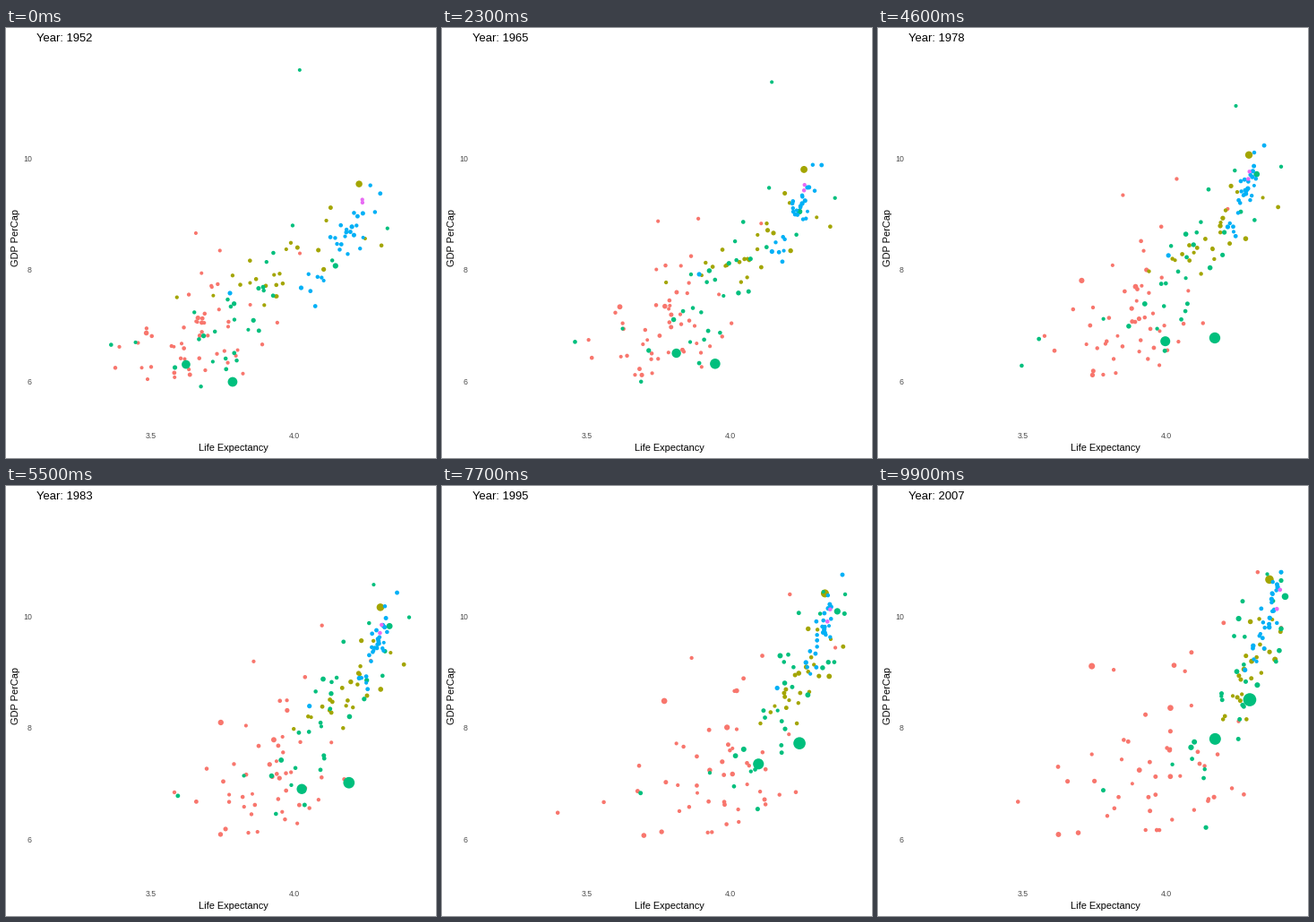
Animation of 480x480 px, one loop 10 s. Source, as a matplotlib script:

```python
import numpy as np
import matplotlib.pyplot as plt
from matplotlib.animation import FuncAnimation

FRAMES, INTERVAL, SIZE, DPI = 100, 100, 480, 72
KEYS = np.arange(1952, 2008, 5)
KNOTS = (1952, 1970, 1988, 2007)
rng = np.random.default_rng(7)

# Dots with a path of their own: (group, population, [(year, life, income), ...])
LEADS = [
    ("asia", 556, [(1952, 44, 400), (1957, 50.5, 576), (1962, 44.5, 488),
                   (1967, 58.4, 613), (1972, 63.1, 677), (1987, 67.3, 1379),
                   (2007, 73, 4959)]),
    ("asia", 400, [(1952, 37.4, 547), (1977, 54.2, 813), (2007, 64.7, 2452)]),
    ("asia", 1, [(1952, 55.6, 108382), (1957, 58, 113523), (1967, 64.6, 80895),
                 (1972, 67.7, 109348), (1977, 69.3, 59265),
                 (1987, 74.2, 28118), (2007, 77.6, 47307)]),
    ("asia", 70, [(1952, 63, 3217), (1972, 73.4, 14779), (2007, 82.6, 31656)]),
    ("asia", 5, [(1952, 39.4, 368), (1972, 40.3, 422), (1977, 31.2, 525),
                 (1982, 51, 624), (2007, 59.7, 1714)]),
    ("asia", 8, [(1952, 28.8, 779), (2007, 43.8, 975)]),
    ("americas", 157, [(1952, 68.4, 13990), (2007, 78.2, 42952)]),
    ("africa", 3, [(1952, 40, 493), (1987, 44, 848), (1992, 23.6, 737),
                   (1997, 36.1, 590), (2007, 46.2, 863)]),
    ("europe", 22, [(1952, 43.6, 1969), (2007, 71.8, 8458)]),
]


def at_keys(values, years=KNOTS):
    return np.interp(KEYS, years, values)


def normal(n):
    """Seeded normal numbers with exact mean 0 and spread 1."""
    z = rng.normal(size=n)
    return np.clip((z - z.mean()) / z.std(), -2.2, 2.2)


def mix(a, b, share):
    return share * a + np.sqrt(1 - share ** 2) * b


class Group:
    """A cloud whose centre and spread (in log units) follow a few knots."""

    def __init__(self, color, count, life, life_sd, income, income_sd,
                 link=0.7, skew=0.0, growth=2.4, pop=5):
        self.color, self.count, self.growth, self.pop = color, count, growth, pop
        self.life, self.life_sd = at_keys(life), at_keys(life_sd)
        self.income, self.income_sd = at_keys(income), at_keys(income_sd)
        self.link, self.skew = link, skew

    def drift(self):
        """Each dot's standing in the group, sliding from a start to an end."""
        first = normal(self.count)
        last = mix(first, normal(self.count), 0.75)
        t = np.linspace(0, 1, len(KEYS))
        jitter = 0.07 * rng.normal(size=(self.count, len(KEYS)))
        return first[:, None] * (1 - t) + last[:, None] * t + jitter

    def tracks(self):
        wealth = self.drift()
        health = mix(wealth, self.drift(), self.link)
        wealth = wealth + self.skew * (wealth ** 2 - 1)
        x = self.life + self.life_sd * health
        y = self.income + self.income_sd * wealth
        return np.stack([np.minimum(x, 4.4), np.clip(y, 5.65, 10.8)], axis=2)

    def pops(self):
        return np.minimum(self.pop * np.exp(0.9 * rng.normal(size=self.count)), 45)


GROUPS = {
    "africa": Group("#F8766D", 51, (3.66, 3.83, 3.96, 3.98), (0.13, 0.12, 0.14, 0.17),
                    (6.9, 7.2, 7.3, 7.45), (0.6, 0.75, 0.85, 0.95),
                    link=0.4, skew=0.2, growth=3.3, pop=3.5),
    "americas": Group("#A3A500", 24, (3.96, 4.12, 4.22, 4.295), (0.16, 0.12, 0.08, 0.05),
                      (8.05, 8.5, 8.75, 9.05), (0.5, 0.48, 0.5, 0.55)),
    "asia": Group("#00BF7D", 27, (3.82, 4.02, 4.16, 4.25), (0.18, 0.16, 0.13, 0.11),
                  (7.25, 7.9, 8.4, 8.8), (0.75, 0.9, 0.95, 1.05), link=0.75, pop=8),
    "europe": Group("#00B0F6", 29, (4.17, 4.258, 4.3, 4.355), (0.07, 0.035, 0.035, 0.034),
                    (8.5, 9.25, 9.6, 10.0), (0.52, 0.45, 0.48, 0.52),
                    link=0.88, growth=1.3, pop=8),
    "oceania": Group("#E76BF3", 2, (4.237, 4.266, 4.317, 4.39), (0.003, 0.004, 0.006, 0.006),
                     (9.24, 9.58, 9.87, 10.3), (0.03, 0.05, 0.06, 0.12), pop=4),
}


def to_px(log_life, log_income):
    return 162 + 320 * (log_life - 3.5), 394.5 - 62.15 * (log_income - 6)


def radius(pop):
    return 1.85 + 5.45 * np.sqrt(pop / 1319)


def build():
    tracks, pops, colors = [], [], []
    for name, group in GROUPS.items():
        paths, sizes = list(group.tracks()), list(group.pops())
        for owner, pop, points in LEADS:
            if owner == name:
                years, life, income = zip(*points)
                paths.append(np.column_stack([at_keys(np.log(life), years),
                                              at_keys(np.log(income), years)]))
                sizes.append(pop)
        tracks += paths
        pops += [p * group.growth ** np.linspace(0, 1, len(KEYS)) for p in sizes]
        colors += [group.color] * len(paths)
    x, y = to_px(*np.moveaxis(np.array(tracks), 2, 0))
    return np.stack([x, y], axis=2), radius(np.array(pops)), colors


def between(values, pos):
    i = min(int(pos), len(KEYS) - 2)
    f = pos - i
    return values[:, i] * (1 - f) + values[:, i + 1] * f


plt.rcParams["font.family"] = "Liberation Sans"
fig = plt.figure(figsize=(SIZE / DPI, SIZE / DPI), dpi=DPI, facecolor="white")
ax = fig.add_axes([0, 0, 1, 1])
ax.set_xlim(0, SIZE)
ax.set_ylim(SIZE, 0)
ax.axis("off")


def label(x, y, text, size, color="black", ha="center", **kw):
    return ax.text(x, y, text, fontsize=size, color=color, ha=ha,
                   va="baseline", **kw)


for value in (6, 8, 10):
    label(29, to_px(0, value)[1] + 3, str(value), 8.8, "#4D4D4D", "right")
for value in (3.5, 4.0):
    label(to_px(value, 0)[0], 458, f"{value:.1f}", 8.8, "#4D4D4D")
label(254, 472, "Life Expectancy", 11)
label(14, 234.5, "GDP PerCap", 11, rotation=90, rotation_mode="anchor")
title = label(34, 15, "", 13, ha="left")

places, radii, colors = build()
cloud = ax.scatter(places[:, 0, 0], places[:, 0, 1], c=colors, linewidths=0)


def draw(k):
    t = k / (FRAMES - 1)
    pos = t * (len(KEYS) - 1)
    cloud.set_offsets(between(places, pos))
    cloud.set_sizes((2 * between(radii, pos)) ** 2)
    title.set_text(f"Year: {round(KEYS[0] + t * (KEYS[-1] - KEYS[0]))}")
    return cloud, title


anim = FuncAnimation(fig, draw, frames=FRAMES, interval=INTERVAL,
                     init_func=lambda: draw(0), repeat=True, repeat_delay=0)
plt.show()
```
